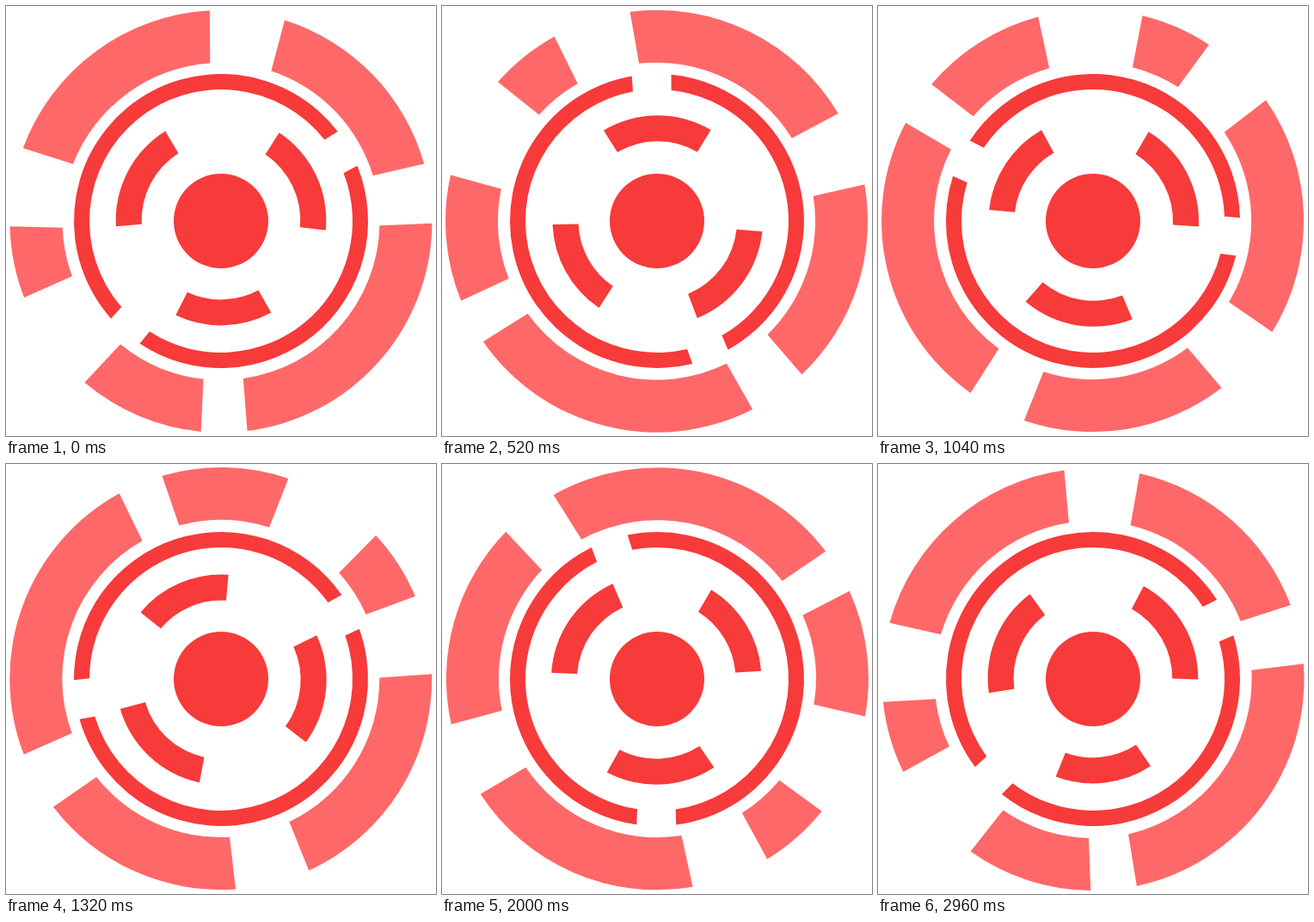
These frames come from a looping animation (500x500 px, 3000 ms). An HTML page:

```html
<!DOCTYPE html>
<html lang="en">
<head>
<meta charset="utf-8">
<title>Rotating rings</title>
<style>
  html, body { margin: 0; width: 100%; height: 100%; overflow: hidden; background: #fff; }
  svg { display: block; width: 100%; height: 100%; }
</style>
</head>
<body>
<svg viewBox="-250 -250 500 500" fill="#f73a3a">
  <path id="outer" fill="#ff6868"/>
  <path id="middle"/>
  <path id="inner"/>
  <circle r="55"/>
</svg>
<script>
const LOOP = 3000, STEP = 40;

// cuts: angles in degrees where the ring turns on and off, clockwise.
// flare: how much further, per edge, the gaps reach at the hole than at the rim.
// shift: vertical offset of the ring from its pivot, which makes it wobble.
const rings = [
  { id: 'outer', r: 245.5, hole: 184.5, dir: 1, flare: 0.9, shift: 0.5,
    cuts: [1, 82.4, 95.9, 129.8, 159.3, 178.2, 200.8, 266.5, 288, 343.7] },
  { id: 'middle', r: 171, hole: 153, dir: -1, flare: 0.7, shift: 0,
    cuts: [-21.7, 123.2, 138.8, 322.2] },
  { id: 'inner', r: 122.3, hole: 92.3, dir: 1, flare: 0.4, shift: -0.9,
    cuts: [-56.2, 5.3, 61.7, 115.3, 176.9, 237.8] }
];

function ringPath({ r, hole, flare, shift, cuts }) {
  const point = (radius, deg) => {
    const a = deg * Math.PI / 180;
    return `${radius * Math.cos(a)} ${radius * Math.sin(a) + shift}`;
  };
  const arc = (radius, large, sweep, deg) =>
    `A${radius} ${radius} 0 ${large} ${sweep} ${point(radius, deg)}`;

  let d = '';
  for (let i = 0; i < cuts.length; i += 2) {
    const from = cuts[i], to = cuts[i + 1], half = flare / 2;
    const large = to - from > 180 ? 1 : 0;
    d += `M${point(r, from - half)}${arc(r, large, 1, to + half)}` +
      `L${point(hole, to - half)}${arc(hole, large, 0, from + half)}Z`;
  }
  return d;
}

for (const ring of rings) {
  ring.el = document.getElementById(ring.id);
  ring.el.setAttribute('d', ringPath(ring));
}

function draw(now) {
  const time = Math.floor((now % LOOP) / STEP) * STEP;
  for (const { el, dir } of rings) {
    el.setAttribute('transform', `rotate(${dir * 360 * time / LOOP})`);
  }
  requestAnimationFrame(draw);
}
draw(0);
</script>
</body>
</html>
```
